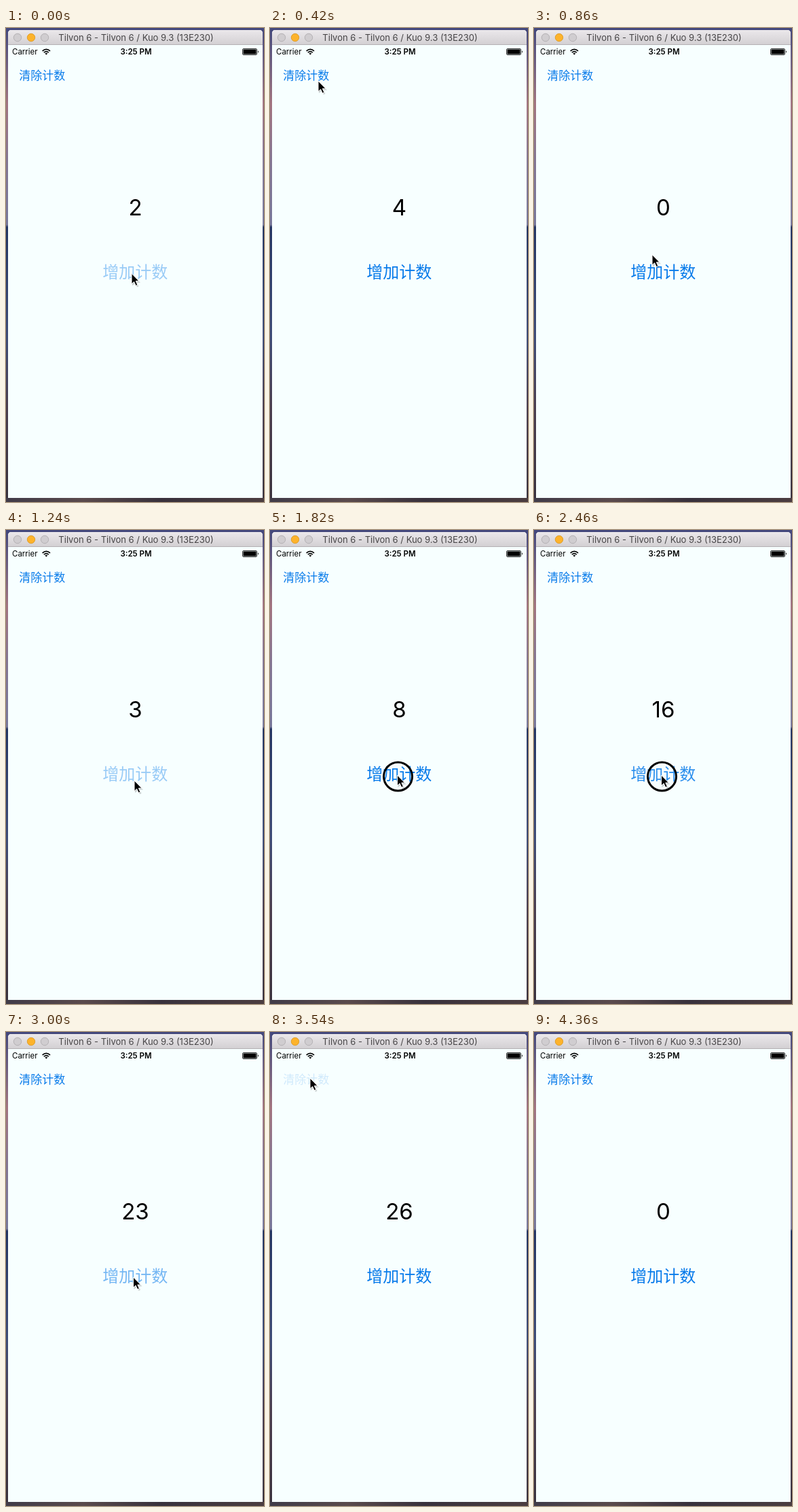
An HTML page for the animation above (4380 ms loop, 380x698 px).

```html
<!DOCTYPE html>
<html lang="zh-CN">
<head>
<meta charset="utf-8">
<title>计数</title>
<style>
  html, body { margin: 0; width: 100%; height: 100%; overflow: hidden; background: #3d3a50; }
  svg { display: block; width: 380px; height: 698px; }
  text { font-family: Inter, "Noto Sans", sans-serif; text-anchor: middle; }
  .button { font-family: "Noto Sans CJK SC", "Noto Sans CJK", sans-serif; fill: #087bea; text-anchor: start; }
</style>
</head>
<body>
<svg viewBox="0 0 380 698">
  <defs>
    <linearGradient id="sky" x2="0" y2="1">
      <stop offset="0" stop-color="#42477c"/>
      <stop offset=".09" stop-color="#75617f"/>
      <stop offset=".16" stop-color="#a2737f"/>
      <stop offset=".28" stop-color="#837592"/>
      <stop offset=".415" stop-color="#77779a"/>
      <stop offset=".42" stop-color="#233462"/>
      <stop offset=".65" stop-color="#3d4b77"/>
      <stop offset=".8" stop-color="#493c4d"/>
      <stop offset="1" stop-color="#372f3b"/>
    </linearGradient>
    <linearGradient id="ground">
      <stop offset="0" stop-color="#403b48"/>
      <stop offset=".3" stop-color="#5a4a4c"/>
      <stop offset=".6" stop-color="#38313c"/>
      <stop offset="1" stop-color="#4b3d40"/>
    </linearGradient>
    <linearGradient id="bar" x2="0" y2="1">
      <stop offset="0" stop-color="#ebe8eb"/>
      <stop offset="1" stop-color="#d2cfd2"/>
    </linearGradient>
  </defs>

  <rect width="380" height="698" fill="url(#sky)"/>
  <rect y="692" width="380" height="6" fill="url(#ground)"/>
  <path d="M3 692V8q0-5 5-5H373q5 0 5 5V692z" fill="#f7ffff"/>
  <path d="M3 25V8q0-5 5-5H373q5 0 5 5V25z" fill="url(#bar)"/>
  <path d="M3 24.5H378" stroke="#b4b1b4"/>
  <g fill="#d0cdd0" stroke="#b5b2b5">
    <circle cx="17" cy="14" r="5.7"/>
    <circle cx="37" cy="14" r="5.7" fill="#fdb32b" stroke="#dfa02f"/>
    <circle cx="57" cy="14" r="5.7"/>
  </g>
  <text x="191.5" y="19" font-size="13" fill="#474547">Tilvon 6 - Tilvon 6 / Kuo 9.3 (13E230)</text>

  <text x="9" y="39.3" font-size="11.5" style="text-anchor:start">Carrier</text>
  <g fill="none" stroke="#000" stroke-width="1.7">
    <path d="M53.6 33.9q5.7-5.2 11.4 0M55.8 36.2q3.5-3.1 7 0"/>
    <path d="M57.3 37.4q2-1.5 4 0l-2 2.2z" fill="#000" stroke="none"/>
  </g>
  <text x="191.5" y="39.3" font-size="11.5" font-weight="600">3:25 PM</text>
  <rect x="348.5" y="30.5" width="21" height="9" rx="1.5" fill="none" stroke="#000" stroke-width=".8"/>
  <rect x="349.5" y="31.5" width="19" height="7" rx=".5"/>
  <path d="M371 33.3q2 1.7 0 3.4z"/>

  <text id="clear" class="button" x="19.3" y="75.8" font-size="17">清除计数</text>
  <text id="count" x="190.5" y="275.7" font-size="33">0</text>
  <text id="add" class="button" x="142.3" y="367.8" font-size="24">增加计数</text>

  <g id="pointer">
    <circle id="ring" cx="1" cy="2" r="21" fill="none" stroke="#000" stroke-width="3"/>
    <path d="M1 2V18L5 14.5 8 20 10.5 19 8 13.5H13z" fill="#000" opacity=".18"/>
    <path d="M0 0V15.5L3.6 12.2 6.2 18 8.8 16.8 6.3 11.2H11z" stroke="#fff" stroke-width="1"/>
  </g>
</svg>
<script>
const LOOP = 4380, STEP = 20, RING = 30, DELAY = 20;
const $ = id => document.getElementById(id);

// Evenly spaced clicks on one button
const series = (first, gap, n) => Array.from({ length: n }, (_, i) => first + i * gap);
const adds = [...series(-30, 100, 3), ...series(1000, 105, 9), ...series(1920, 80, 17)];
const clears = [560, 3525];

// Pointer stops: time, x, y
const path = [
  [0, 185, 361.5], [220, 186, 362], [420, 71, 78], [480, 62, 70], [640, 62, 70],
  [920, 189, 369], [1260, 189, 369], [1500, 187.5, 361], [3250, 187.5, 361],
  [3460, 59, 68], [3680, 59, 68], [3960, 150, -24], [LOOP, 150, -24]
];

function pointerAt(t) {
  const i = path.findIndex(stop => stop[0] > t);
  const [t0, x0, y0] = path[i - 1], [t1, x1, y1] = path[i];
  const p = (t - t0) / (t1 - t0), e = p * p * (3 - 2 * p);
  return [x0 + (x1 - x0) * e, y0 + (y1 - y0) * e];
}

function countAt(t) {
  const done = c => c + DELAY <= t;
  const reset = clears.filter(done).pop();
  const start = reset === undefined ? 1 : 0;
  return start + adds.filter(c => done(c) && (start || c > reset)).length;
}

// A button dims on release, then fades back
function opacityAt(clicks, t) {
  const last = clicks.filter(c => c <= t).pop();
  if (last === undefined) return 1;
  return Math.min(1, 0.16 + 0.84 * Math.max(0, t - last - 15) / 55);
}

function draw(now) {
  const t = Math.floor(now % LOOP / STEP) * STEP;
  const pressed = [...adds, ...clears].some(c => t >= c - RING && t < c);
  $("count").textContent = countAt(t);
  $("add").setAttribute("opacity", opacityAt(adds, t));
  $("clear").setAttribute("opacity", opacityAt(clears, t));
  $("ring").setAttribute("visibility", pressed ? "visible" : "hidden");
  $("pointer").setAttribute("transform", `translate(${pointerAt(t)})`);
}

const began = performance.now();
function tick() {
  draw(performance.now() - began);
  requestAnimationFrame(tick);
}
tick();
</script>
</body>
</html>
```
